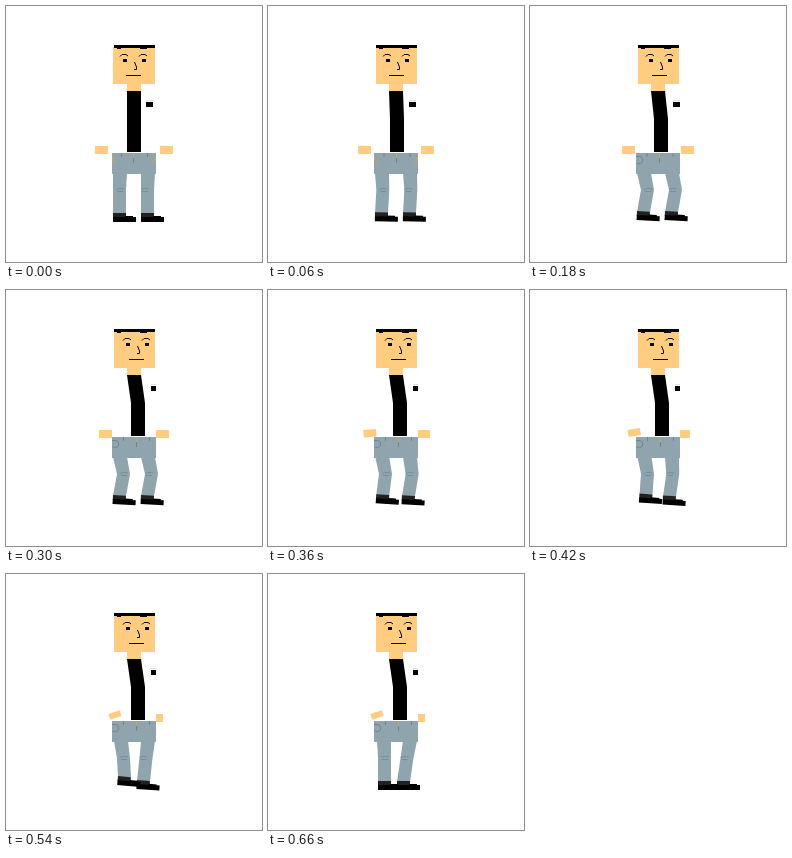
Animation, 256 px wide and 256 px high, one loop 0.72 s. Source, as an HTML page with a canvas:

```html
<!DOCTYPE html>
<html>
<head>
<meta charset="utf-8">
<style>
  html, body { margin: 0; width: 100%; height: 100%; overflow: hidden; background: #fff; }
  canvas { display: block; }
</style>
</head>
<body>
<canvas id="stage" width="256" height="256"></canvas>
<script>
const ctx = document.getElementById('stage').getContext('2d');
const SKIN = '#ffcc80', DENIM = '#90a4ae', SEAM = '#708690', GOLD = '#c9a94f';
const STEP = 60, STEPS = 12;

const ramp = (t, start, end) => Math.min(1, Math.max(0, (t - start) / (end - start)));

function rect(color, x, y, w, h) {
  ctx.fillStyle = color;
  ctx.fillRect(Math.round(x), y, Math.round(w), h);
}

function fill(color, d) {
  ctx.fillStyle = color;
  ctx.fill(new Path2D(d));
}

function stroke(color, d, width = 1) {
  ctx.strokeStyle = color;
  ctx.lineWidth = width;
  ctx.stroke(new Path2D(d));
}

function placed(x, y, angle, draw) {
  ctx.save();
  ctx.translate(x, y);
  ctx.rotate(angle * Math.PI / 180);
  draw();
  ctx.restore();
}

function head(turn) {
  const left = 107 + Math.ceil(turn);
  rect(SKIN, left, 41, 149 - left, 37);
  rect(SKIN, 121, 77, 14, 8);
  rect('#000', 108, 39, 41, 3);
  rect('#000', 111, 42, 4, 1);
  rect('#000', 134, 42, 7, 1);
  placed(Math.round(3 * turn), 0, 0, () => {
    for (const x of [114, 133]) {
      stroke('#000', `M${x} 50.5 L${x + 2} 48.5 H${x + 6} L${x + 8} 50`);
      rect('#000', x + 3, 53, 4, 3);
    }
    stroke('#000', 'M128.5 56 L130.5 61 V63.5 H128');
    rect('#000', 120, 69, 15, 1);
  });
}

function torso(turn) {
  const lean = 4 * turn;
  fill('#000', `M121 85 H135 L${135 + lean} 113 V146 H${121 + lean} V113Z`);
  const x = Math.floor(140 + 5 * turn), width = Math.min(7, 150 - x);
  rect('#e0e0e0', x, 94, width, 1);
  rect('#000', x, 96, width, 5);
}

function hands(turn, lift) {
  placed(95.5 + 4 * turn + 9.5 * lift, 144 - 3 * lift, -19 * lift, () => {
    const width = 13 - lift, height = 8 - 2 * lift;
    ctx.fillStyle = SKIN;
    ctx.fillRect(-width / 2, -height / 2, width, height);
  });
  rect(SKIN, 154 - 4 * turn, 140, 13 - 6 * lift, 8);
}

function jeans(turn) {
  rect(DENIM, 106, 147, 44, 21);
  const fly = Math.round(127 + 3 * turn);
  rect(GOLD, fly, 148, 1, 4);
  stroke(SEAM, `M${fly + .5} 152 V157`);
  for (const x of [115.5, 141.5]) stroke(SEAM, `M${x + 2 * turn} 147 V151`);
  if (turn < .75) {
    stroke(GOLD, 'M106.5 150 Q107 157 110 157 M149.5 150 Q149 157 146 157');
  } else {
    stroke(SEAM, 'M106 150.5 H110 Q113 151 112.5 156 Q110 159 106.5 157');
  }
}

function leg(hip, knee, ankle, y, angle, crease) {
  fill(DENIM, `M${hip} 167 L${knee} 184 L${ankle} ${y + 1} h13 L${knee + 13} 184 L${hip + 14} 167Z`);
  const x = knee + crease;
  stroke(SEAM, `M${x} 183.5 q4 -2 8 -.5 M${x + 1} 185.5 h6`, .7);
  placed(ankle, y, angle, () => {
    rect('#212121', 0, 0, 13, 5);
    rect('#000', 0, 4, 23, 5);
    rect('#000', 12, 3, 8, 2);
  });
}

function draw(step) {
  const turn = ramp(step, 0, 4), bend = ramp(step, 0, 3);
  const lift = ramp(step, 5, 9), plant = ramp(step, 9, 11);

  rect('#fff', 0, 0, 256, 256);
  head(turn);
  torso(turn);
  hands(turn, lift);
  leg(135, 135 + 4 * bend - 5.5 * lift - plant, 135 - 4 * lift - 2 * plant,
    207 - 2 * bend + lift + plant, 3 * bend + lift - 4 * plant, 0);
  leg(107 + lift + plant, 107 + 4 * bend - plant, 107 + 5 * lift - 2 * plant,
    207 - 2 * bend - 3 * lift + 5 * plant, 3 * bend + 2 * lift - 5 * plant, 3);
  jeans(turn);
}

function tick() {
  draw(Math.floor(performance.now() / STEP) % STEPS);
  requestAnimationFrame(tick);
}
tick();
</script>
</body>
</html>
```
